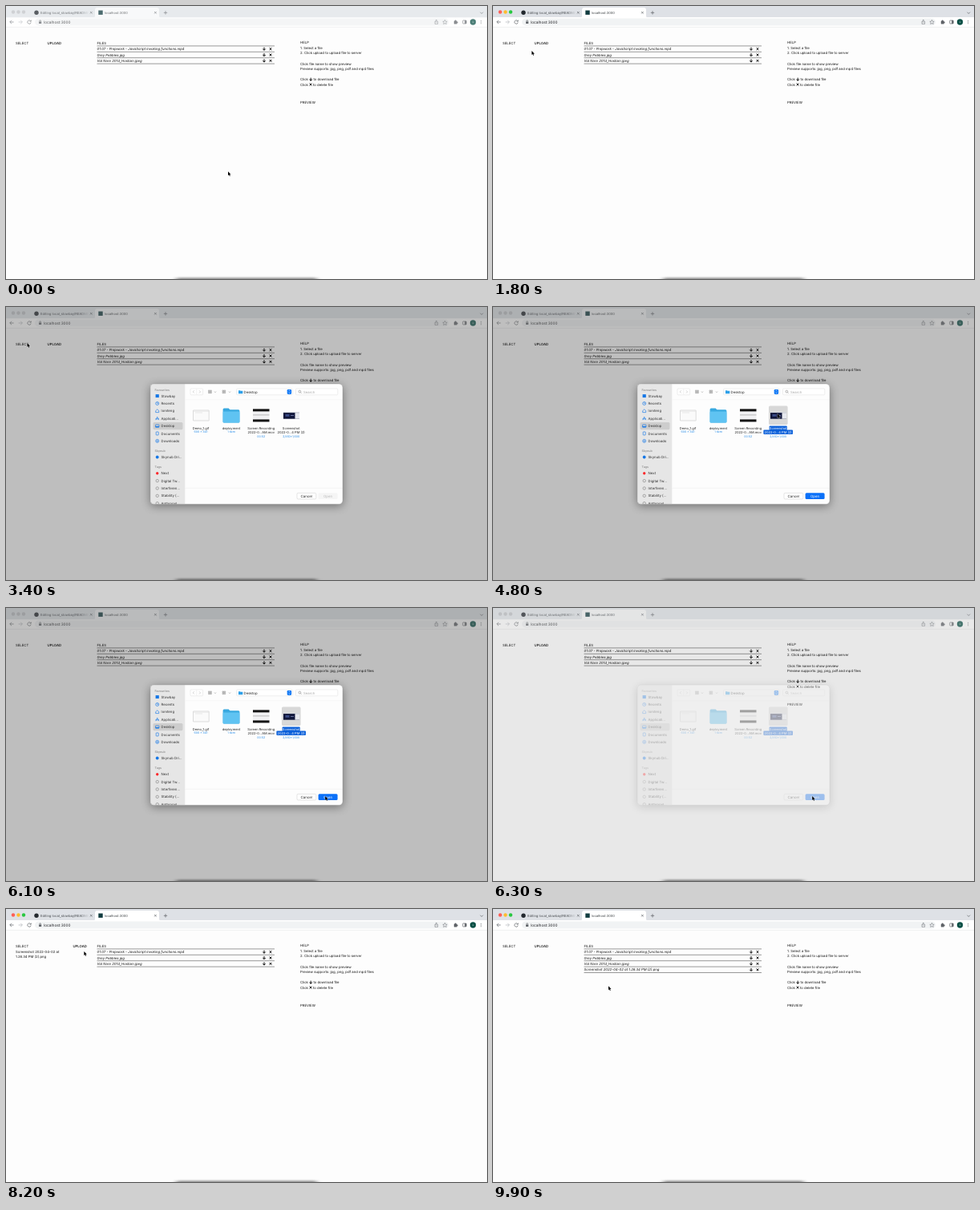
An HTML page for the animation above (10000 ms loop, 600 px wide and 341 px high).

```html
<!DOCTYPE html>
<html lang="en">
<head>
<meta charset="utf-8">
<title>Local file box</title>
<style>
html, body { margin: 0; width: 100%; height: 100%; overflow: hidden; background: #fdfdfd; }
svg { display: block; width: 100%; height: 100%; font-family: Inter, Roboto, sans-serif; text-rendering: geometricPrecision; }
text { white-space: pre; }
.icon { fill: none; stroke: #5f6368; stroke-width: .7; }
</style>
</head>
<body>
<svg id="stage" viewBox="0 0 600 341" preserveAspectRatio="none"></svg>
<script>
const stage = document.getElementById('stage');
const LOOP = 10000, STEP = 100;

// y is the middle of the capital letters
const text = (x, y, s, size = 4.28, attrs = '') =>
  `<text x="${x}" y="${y + size * .364}" font-size="${size}" ${attrs}>${s}</text>`;
const rect = (x, y, w, h, fill, r = 0, attrs = '') =>
  `<rect x="${x}" y="${y}" width="${w}" height="${h}" rx="${r}" fill="${fill}" ${attrs}/>`;
const circle = (x, y, r, fill, attrs = '') =>
  `<circle cx="${x}" cy="${y}" r="${r}" fill="${fill}" ${attrs}/>`;
const path = (d, attrs = 'class="icon"') => `<path d="${d}" ${attrs}/>`;
const line = (x1, x2, y, color = '#333', width = .5) =>
  path(`M${x1} ${y}H${x2}`, `stroke="${color}" stroke-width="${width}"`);
const cross = (x, y, r, attrs) =>
  path(`M${x - r} ${y - r}l${2 * r} ${2 * r}m0 ${-2 * r}l${-2 * r} ${2 * r}`, attrs);

const bold = 'fill="none" stroke="#000" stroke-width="1"';
const downIcon = (x, y) => path(`M${x} ${y - 1.9}v3.4m-1.7 -1.5l1.7 1.7l1.7 -1.7`, bold);
const deleteIcon = (x, y) => cross(x, y, 1.35, bold);

function browser() {
  const lights = [9, 15.5, 22].map(x => circle(x, 7.5, 2.2, '#ccc', 'class="light"')).join('');
  const tabs =
    path('M108 15Q111 15 111 12V5Q111 2 114 2H188Q191 2 191 5V12Q191 15 194 15Z', 'fill="#fff"') +
    circle(38, 8.2, 2.7, '#24292f') +
    text(43, 8.3, 'Editing local_stowbay/README', 4.15, 'fill="url(#fade)"') +
    cross(106.3, 8.3, 1.3) +
    rect(115.3, 5.5, 5.4, 5.4, '#123c40') +
    text(123, 8.3, 'localhost:3000', 4.1, 'fill="#3c4043"') +
    cross(186.4, 8.3, 1.3) +
    path('M196.8 8.4h4.4m-2.2 -2.2v4.4M591.5 7.7l1.8 1.8l1.8 -1.8');
  const bar = rect(0, 14, 600, 12.3, '#fff') + line(0, 600, 26.4, '#dcdee1') +
    rect(36, 15.6, 516, 8.8, '#f1f3f4', 4.4) +
    path('M9.6 20H4.8m2.2 -2.2L4.8 20l2.2 2.2') +
    path('M15.6 20h4.8m-2.2 -2.2l2.2 2.2l-2.2 2.2', 'class="icon" style="stroke:#b4b7ba"') +
    path('M30.7 18.6a2.2 2.2 0 1 0 .5 1.9M31.3 17.5v1.7h-1.8') +
    rect(41, 19.4, 3.2, 2.7, '#5f6368', .4) + path('M41.7 19.5v-.8a.9 .9 0 0 1 1.8 0v.8') +
    text(47, 20, 'localhost:3000', 4.76, 'fill="#202124"') +
    path('M536 19.2h-1v3.2h3.6v-3.2h-1M536.8 20.9v-3.6m-1.1 1l1.1 -1l1.1 1', 'class="icon" style="stroke-width:.5"') +
    path('M547.5 17.4l.8 1.8l1.9 .2l-1.4 1.3l.4 1.9l-1.7 -1l-1.7 1l.4 -1.9l-1.4 -1.3l1.9 -.2z', 'class="icon" style="stroke-width:.5"') +
    rect(558.8, 18.5, 3.8, 4, '#5f6368', .5) + circle(560.7, 18.4, .9, '#5f6368') + circle(562.8, 20.5, .9, '#5f6368') +
    rect(569.8, 18, 4.4, 4, 'none', .5, 'class="icon"') + rect(572.2, 18, 2, 4, '#5f6368') +
    circle(582.5, 20, 3.7, '#0b5147') + text(582.5, 20, 'L', 3, 'fill="#fff" text-anchor="middle"') +
    [18.2, 20, 21.8].map(y => circle(592.7, y, .5, '#5f6368')).join('');
  return rect(0, 0, 600, 15, '#dee1e6', 0, 'id="strip"') + lights + `<g id="chrome">${tabs}${bar}</g>`;
}

const fileRow = (name, i) => {
  const y = 53.6 + i * 7.4;
  return text(113.6, y, name, 4.28, 'font-style="italic"') +
    downIcon(322, y) + deleteIcon(330, y) + line(113.5, 335, y + 3.7);
};

function page() {
  const files = ['01:07 - Prepwork - JavaScript invoking functions.mp4', 'Grey Pebbles.jpg', 'Val Nore 2014_Hostam.jpeg'];
  const help = [[45.7, 'HELP'], [52.2, '1. Select a file'], [58.8, '2. Click upload to upload file to server'],
    [72, 'Click file name to show preview'], [78.5, 'Preview supports: jpg, png, pdf and mp4 files'],
    [91.6, 'Click'], [98.1, 'Click'], [120.7, 'PREVIEW']];
  return `<g fill="#111">` +
    text(12, 46, 'SELECT') +
    `<g id="chosen">${text(12, 53.2, 'Screenshot 2022-04-02 at')}${text(12, 59.7, '1.26.34 PM (2).png')}</g>` +
    `<g id="upload">${text(51.6, 46, 'UPLOAD', 4.28, 'font-weight="500" fill="#000"')}</g>` +
    text(113.6, 46, 'FILES') + line(113.5, 335, 49.9) +
    files.map(fileRow).join('') +
    `<g id="uploaded">${fileRow('Screenshot 2022-04-02 at 1.26.34 PM (2).png', 3)}</g>` +
    help.map(([y, s]) => text(367, y, s)).join('') +
    downIcon(380.2, 91.6) + text(383.4, 91.6, 'to download file') +
    deleteIcon(380, 98.1) + text(383, 98.1, 'to delete file') +
    `</g>` + rect(212, 339.6, 176, 5, '#888', 2, 'filter="url(#soft)"');
}

function sidebar() {
  const heading = (y, s) => text(185.5, y, s, 3.7, 'fill="#8a8a8a" font-weight="500"');
  const blue = 'fill="none" stroke="#1577e6" stroke-width=".65"';
  const icons = [
    y => rect(186.6, y - 2, 4.2, 4, '#1577e6'),
    y => circle(188.7, y, 2, 'none', blue) + path(`M188.7 ${y - 1.2}v1.3h1`, blue),
    y => path(`M186.7 ${y + 1.8}v-2l2 -1.8l2 1.8v2z`, blue),
    y => path(`M186.8 ${y + 1.9}l1.9 -3.9l1.9 3.9M186.5 ${y + .6}h4.4`, blue),
    y => rect(186.5, y - 1.6, 4.4, 3.2, 'none', .4, blue) + rect(186.5, y + .4, 4.4, 1.2, '#1577e6'),
    y => rect(187.2, y - 2, 3, 4, 'none', .4, blue),
    y => circle(188.7, y, 2, 'none', blue) + path(`M188.7 ${y - 1.1}v2m-.8 -.8l.8 .8l.8 -.8`, blue)
  ];
  const places = ['Stowbay', 'Recents', 'lomteng', 'Applicati...', 'Desktop', 'Documents', 'Downloads'];
  const tags = ['Next', 'Digital Tw...', 'Interferen...', 'Stability (...', 'Anthropol...'];
  const item = (y, s) => text(193.6, y, s, 4.3, 'fill="#2c2c2c"');
  return rect(180, 96, 43.3, 150.3, '#e6e6e6') + line(180, 180, 96) +
    rect(183.5, 143.9, 37, 9.3, '#cdcdcd', 1.6) +
    heading(103.8, 'Favourites') +
    places.map((s, i) => { const y = 111.1 + i * 9.37; return icons[i](y) + item(y, s); }).join('') +
    heading(180, 'Skynub') + circle(188.7, 187.5, 1.9, '#1577e6') + item(187.5, 'Skynub Dri...') +
    heading(200, 'Tags') +
    tags.map((s, i) => {
      const y = 207.7 + i * 9.37;
      return circle(188.7, y, 1.7, i ? 'none' : '#fb2b2e', i ? 'stroke="#666" stroke-width=".5"' : '') + item(y, s);
    }).join('');
}

function fileGrid() {
  const label = (x, y, s, attrs = 'fill="#222"') => text(x, y, s, 4.05, `text-anchor="middle" ${attrs}`);
  const info = (x, y, s) => text(x, y, s, 3.55, 'text-anchor="middle" fill="#1b86e8"');
  return rect(233.5, 129, 19.7, 13, '#fafafa', .3, 'stroke="#bbb" stroke-width=".5"') +
    line(234, 253, 130.4, '#ddd') + line(236, 245, 132, '#ccc', .4) +
    label(243, 151.2, 'Demo_1.gif') + info(243, 156, '600 × 341') +
    path('M270.6 128q0 -1.5 1.5 -1.5h5.5l1.8 1.7h10.5q1.5 0 1.5 1.5v13.2q0 1.5 -1.5 1.5h-17.8q-1.5 0 -1.5 -1.5z', 'fill="#38a9e0"') +
    rect(270.6, 130.6, 20.8, 13.9, '#5fc3f2', 1.3) +
    label(281, 151.2, 'deployment') + info(281, 156, '1 item') +
    rect(308, 127.4, 20.5, 16, '#f1f1f3') + rect(308, 127.4, 20.5, 3, '#111') +
    rect(308, 134.5, 20.5, .8, '#aaa') + rect(308, 140.4, 20.5, 3, '#161616') +
    label(318.2, 151.2, 'Screen Recording') + label(318.2, 156.5, '2022-0...AM.mov') + info(318.2, 161.4, '00:52') +
    `<g id="picked">${rect(344, 123.5, 23.6, 23.4, '#d8d8d8', 1.6)}${rect(344.6, 148.4, 22.2, 5.6, '#0b60da', 1)}${rect(337.4, 153.6, 36.6, 5.5, '#0b60da', 1)}</g>` +
    rect(346, 131, 20, 8.7, '#10163a') + rect(346, 131, 20, 1.1, '#d5d8de') +
    rect(360.5, 132.1, 5.5, 7.6, '#e6e8ee') + rect(348.5, 134, 5, 2.8, '#3a4a86') + rect(355, 135, 4, .8, '#7d88b8') +
    `<g id="pickedName">${label(355.7, 151.2, 'Screenshot', '')}${label(355.7, 156.5, '2022-0...4 PM (2)', '')}</g>` +
    info(355.7, 161.4, '2,560×1,600');
}

function dialog() {
  const thin = 'fill="none" stroke="#777" stroke-width=".55"';
  const border = 'stroke="#d4d4d4" stroke-width=".4"';
  const chevron = x => path(`M${x - 1} 105.6l1 1l1 -1`, thin);
  const squares = x => [0, 2.2].map(dx => [0, 2.2].map(dy =>
    rect(x + dx, 104 + dy, 1.5, 1.5, 'none', .2, thin)).join('')).join('');
  const controls =
    rect(230, 102, 15.6, 7.8, '#fff', 1.3, border) + path('M237.8 102.5v6.8', 'stroke="#ddd" stroke-width=".4"') +
    path('M234.8 104.3l-1.6 1.6l1.6 1.6M241 104.3l1.6 1.6l-1.6 1.6', 'fill="none" stroke="#b5b5b5" stroke-width=".6"') +
    squares(252.6) + chevron(261) + squares(270) + chevron(279) +
    rect(287.5, 102, 69.8, 7.8, '#fff', 1.3, border) +
    path('M290 104.2h2l.6 .6h2.7v3.4h-5.3z', 'fill="#2d9fe8"') +
    text(296.6, 106, 'Desktop', 4.35, 'fill="#222"') +
    rect(350.7, 102.9, 5.4, 6, '#0a75f5', 1.3) +
    path('M352.3 105.2l1.1 -1.1l1.1 1.1m-2.2 1.5l1.1 1.1l1.1 -1.1', 'fill="none" stroke="#fff" stroke-width=".6"') +
    rect(361.5, 102, 52.3, 7.8, '#fff', 1.3, border) +
    circle(366.4, 105.6, 1.4, 'none', thin) + path('M367.4 106.6l1.2 1.2', thin) +
    text(371, 106, 'Search', 4.3, 'fill="#a8a8a8"');
  const buttons =
    rect(363, 232.3, 23.8, 7.6, '#fff', 1.5, 'stroke="#c8c8c8" stroke-width=".5"') +
    text(374.8, 236.2, 'Cancel', 4.4, 'text-anchor="middle" fill="#222"') +
    rect(389.6, 232.3, 24, 7.6, '#f5f5f5', 1.5, 'id="openButton"') +
    `<g id="openLabel">${text(401.5, 236.2, 'Open', 4.4, 'text-anchor="middle"')}</g>`;
  return `<g id="dialog">` +
    rect(180, 98.5, 240, 150, '#000', 4.5, 'opacity=".42" filter="url(#shadow)"') +
    rect(180, 96, 240, 150.3, '#fdfdfd', 4.5) +
    `<g clip-path="url(#sheet)">${sidebar()}</g>` +
    line(223.3, 420, 115.8, '#ececec', .4) + line(223.3, 420, 226.3, '#e6e6e6', .4) +
    controls + fileGrid() + buttons +
    rect(180, 96, 240, 150.3, 'none', 4.5, 'stroke="#999" stroke-width=".4"') + `</g>`;
}

stage.innerHTML = `<defs>
  <linearGradient id="fade" gradientUnits="userSpaceOnUse" x1="93" x2="103">
    <stop stop-color="#45494d"/><stop offset="1" stop-color="#45494d" stop-opacity="0"/></linearGradient>
  <filter id="soft" x="-10%" y="-200%" width="120%" height="500%"><feGaussianBlur stdDeviation="3 1"/></filter>
  <filter id="shadow" x="-15%" y="-20%" width="130%" height="140%"><feGaussianBlur stdDeviation="6"/></filter>
  <clipPath id="sheet">${rect(180, 96, 240, 150.3, '#000', 4.5)}</clipPath></defs>` +
  rect(0, 0, 600, 341, '#fdfdfd') + browser() + page() +
  rect(0, 0, 600, 341, '#000', 0, 'id="dim"') + dialog() +
  path('M0 0V5L1.1 4L1.9 5.8L2.8 5.4L2 3.7H3.5Z', 'id="cursor" fill="#000" stroke="#fff" stroke-width=".5" paint-order="stroke"');

const part = Object.fromEntries([...stage.querySelectorAll('[id]')].map(el => [el.id, el]));
const lights = [...stage.querySelectorAll('.light')];
const set = (el, name, value) => el.setAttribute(name, value);
const show = (el, on) => set(el, 'visibility', on ? 'visible' : 'hidden');
const ramp = (t, from, to) => Math.min(1, Math.max(0, (t - from) / (to - from)));
const between = (t, from, to) => t >= from && t < to;

// Pointer moves: start, end, x, y
const moves = [
  [1000, 1400, 117.5, 94], [1500, 1800, 48.3, 56], [1900, 2400, 26.5, 45],
  [3600, 4000, 263.5, 143], [4100, 4300, 361, 184], [4400, 4800, 355, 133.5],
  [5100, 5300, 409.5, 232.5], [5500, 5800, 398.2, 235], [6700, 7100, 169, 95],
  [7200, 7500, 104.5, 65], [7700, 8500, 94, 47.3], [9700, 9900, 144, 96.3]
];

function pointer(t) {
  let x = 277, y = 206.8;
  for (const [from, to, nx, ny] of moves) {
    const p = ramp(t, from, to), e = p * p * (3 - 2 * p);
    x += (nx - x) * e;
    y += (ny - y) * e;
  }
  return `translate(${x} ${y})`;
}

function draw(t) {
  const focused = between(t, 500, 3300) || t >= 6400;
  ['#ff5f57', '#febc2e', '#28c840'].forEach((color, i) => set(lights[i], 'fill', focused ? color : '#cfd1d4'));
  set(part.strip, 'fill', focused ? '#dee1e6' : '#e7eaed');
  set(part.chrome, 'opacity', focused ? 1 : .72);

  const gone = 1 - ramp(t, 6100, 6400);
  const opening = ramp(t, 3000, 3400);
  const rise = 1 - opening;
  set(part.dim, 'opacity', .25 * (1 - rise ** 1.5) * gone);
  set(part.dialog, 'opacity', Math.min(1, opening * 1.88) * gone);
  set(part.dialog, 'transform', `translate(0 ${-26 * rise * rise})`);
  show(part.dialog, opening > 0 && gone > 0);

  const picked = t >= 4800;
  set(part.picked, 'opacity', picked ? 1 : 0);
  set(part.pickedName, 'fill', picked ? '#fff' : '#222');
  set(part.openButton, 'fill', !picked ? '#f5f5f5' : t === 6000 ? '#075fd6' : '#0a70f8');
  set(part.openLabel, 'fill', picked ? '#fff' : '#b8b8b8');

  const chosen = between(t, 6400, 9100);
  show(part.chosen, chosen);
  set(part.upload, 'transform', `translate(${chosen ? 31.8 : 0} 0)`);
  show(part.uploaded, t >= 9100);
  set(part.cursor, 'transform', pointer(t));
}

const start = performance.now();
function tick() {
  const t = (performance.now() - start) % LOOP;
  draw(Math.floor(t / STEP) * STEP);
  requestAnimationFrame(tick);
}
tick();
</script>
</body>
</html>
```
